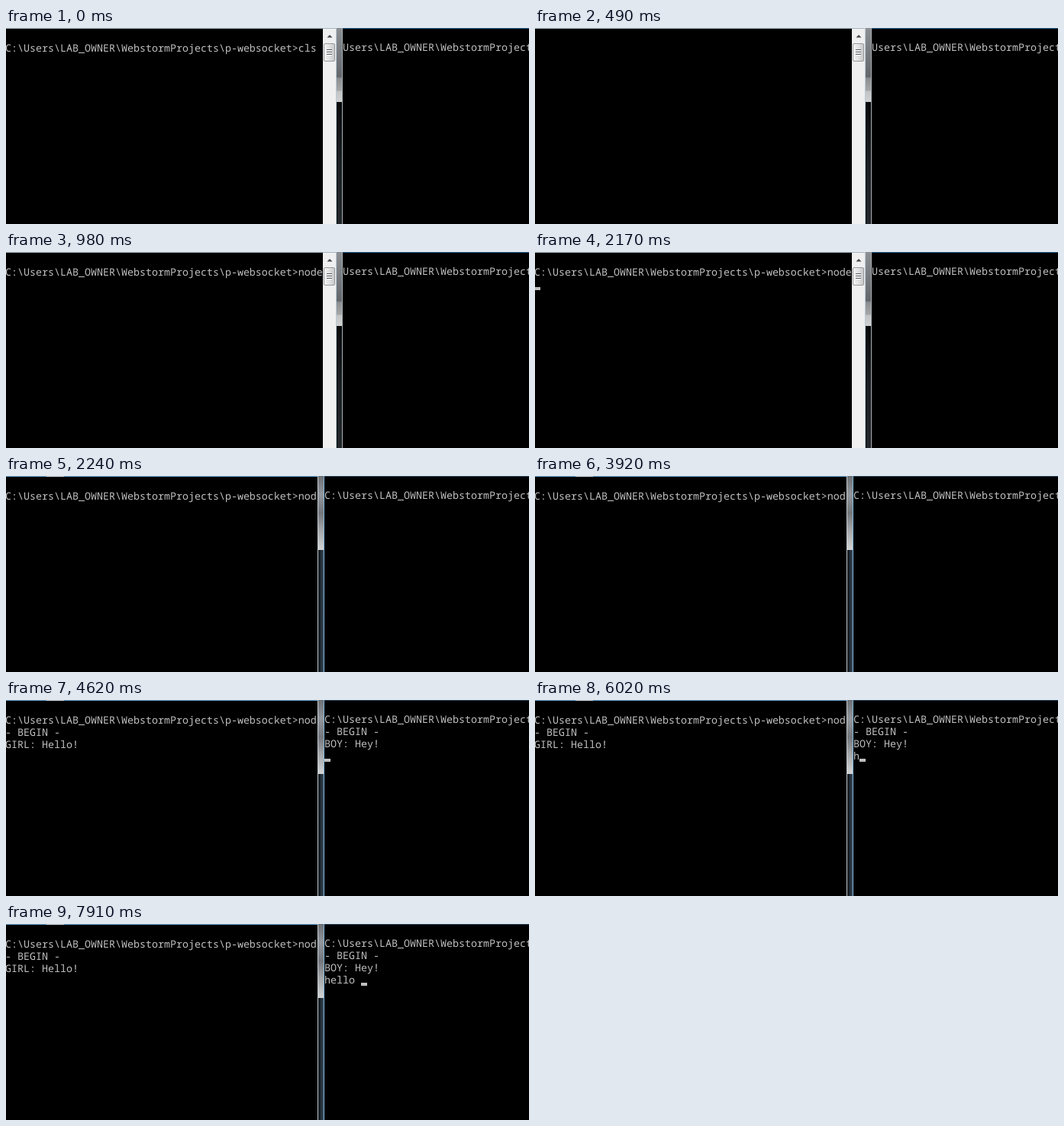
Animation of 685 by 257 pixels, one loop 8000 ms. Source, as an HTML page:

```html
<!DOCTYPE html>
<html lang="en">
<head>
<meta charset="utf-8">
<title>Two consoles</title>
<style>
  html, body { margin: 0; width: 100%; height: 100%; overflow: hidden; background: #000; }
  svg { display: block; width: 685px; height: 257px; }
  text {
    font: 13.3333px "Noto Sans Mono", "DejaVu Sans Mono", monospace;
    fill: #c0c0c0;
    white-space: pre;
    text-rendering: geometricPrecision;
  }
</style>
</head>
<body>
<svg viewBox="0 0 685 257" xmlns="http://www.w3.org/2000/svg">
  <defs>
    <linearGradient id="glass" x2="0" y2="1">
      <stop offset="0" stop-color="#8d9093"/>
      <stop offset=".35" stop-color="#777a7e"/>
      <stop offset=".66" stop-color="#64686c"/>
      <stop offset=".68" stop-color="#8c8f91"/>
      <stop offset=".84" stop-color="#a4a6a7"/>
      <stop offset=".86" stop-color="#c3c4c5"/>
      <stop offset="1" stop-color="#d0d1d1"/>
    </linearGradient>
    <linearGradient id="streak" x2="0" y2="1">
      <stop offset="0" stop-color="#6c7176"/>
      <stop offset=".25" stop-color="#92979c"/>
      <stop offset=".5" stop-color="#73787d"/>
      <stop offset=".72" stop-color="#a2a5a8"/>
      <stop offset="1" stop-color="#d2d4d5"/>
    </linearGradient>
    <linearGradient id="dark" x2="0" y2="1">
      <stop offset="0" stop-color="#08090b"/>
      <stop offset=".5" stop-color="#1b1f23"/>
      <stop offset="1" stop-color="#23272b"/>
    </linearGradient>
    <linearGradient id="edge">
      <stop offset="0" stop-color="#12161a"/>
      <stop offset=".5" stop-color="#232d36"/>
      <stop offset="1" stop-color="#3a5063"/>
    </linearGradient>
    <linearGradient id="thumb">
      <stop offset="0" stop-color="#f4f4f4"/>
      <stop offset=".5" stop-color="#e2e2e3"/>
      <stop offset="1" stop-color="#c6c6c8"/>
    </linearGradient>
    <clipPath id="leftClip"><rect id="leftBox" height="257"/></clipPath>
    <clipPath id="rightClip"><rect id="rightBox" height="257"/></clipPath>
  </defs>
  <rect width="685" height="257"/>
  <g clip-path="url(#leftClip)" id="left"></g>
  <g clip-path="url(#rightClip)" id="right"></g>

  <g id="leftFront">
    <rect width="434" height="1" fill="#a3b4c0"/>
    <rect x="441" width="244" height="1" fill="#2a5f8d"/>
    <rect x="415" y="1" width="17" height="256" fill="#f0f0f0"/>
    <path d="M420.500 12.500L424 9L427.500 12.500Z" fill="#404347"/>
    <rect x="416.500" y="20.500" width="14" height="23" rx="1.500" fill="url(#thumb)" stroke="#96989b"/>
    <path d="M420 28.500h7M420 31.500h7M420 34.500h7" stroke="#55585c"/>
    <path d="M420 29.500h7M420 32.500h7M420 35.500h7" stroke="#fff"/>
    <rect x="432" width="1" height="257" fill="#b7c9d5"/>
    <rect x="433" width="7" height="97" fill="url(#glass)"/>
    <rect x="433" y="97" width="7" height="160" fill="url(#dark)"/>
    <rect x="433" y="97" width="1" height="160" fill="#08090a"/>
    <rect x="440" width="1" height="257" fill="#a9adb1"/>
  </g>

  <g id="rightFront">
    <rect width="408" height="1" fill="#6aa6d2"/>
    <rect x="53" width="23" height="1" fill="#d9e2e8"/>
    <rect x="417" width="268" height="1" fill="#24435a"/>
    <rect x="408" width="1" height="257" fill="#c3cad0"/>
    <rect x="409" width="7" height="97" fill="url(#streak)"/>
    <rect x="409" y="97" width="7" height="160" fill="url(#edge)"/>
    <rect x="416" width="1" height="257" fill="#83b4d6"/>
  </g>
</svg>
<script>
const LOOP = 8000, CELL = 8, ROW = 16;
const PROMPT = "C:\\Users\\LAB_OWNER\\WebstormProjects\\p-websocket>";
const $ = id => document.getElementById(id);

function add(parent, tag, attrs) {
  const el = document.createElementNS("http://www.w3.org/2000/svg", tag);
  for (const key in attrs) el.setAttribute(key, attrs[key]);
  return parent.appendChild(el);
}

function makeConsole(parent, x, base) {
  const rows = [0, 1, 2, 3].map(i => add(parent, "text", { x, y: base + i * ROW }));
  const caret = add(parent, "rect", { width: CELL, height: 4, fill: "#c0c0c0" });
  return (lines, cursor) => {
    rows.forEach((row, i) => { row.textContent = lines[i] || ""; });
    caret.style.display = cursor ? "" : "none";
    if (!cursor) return;
    caret.setAttribute("x", x + cursor[0] * CELL);
    caret.setAttribute("y", base - 1 + cursor[1] * ROW);
  };
}

// Value of the last [time, value] step already reached.
const at = (steps, t) => steps.reduce((v, [start, next]) => t >= start ? next : v, null);

const drawLeft = makeConsole($("left"), -1, 31);
const drawRight = makeConsole($("right"), 417, 30);

const command = [[0, PROMPT + "cls"], [490, ""], [560, PROMPT], [980, PROMPT + "node"]];
const leftCursor = [[70, [51, 0]], [490, null], [1050, [0, 1]], [1540, null], [2030, [0, 1]], [2240, null]];
const scroll = [[0, 0], [2940, 2], [3570, 3], [3920, 0]];
const typed = [[0, 0], [6020, 1], [6090, 2], [6300, 3], [6510, 4], [6650, 5]];
const rightCursor = [[4620, 0], [5040, null], [5530, 0], [6020, 1], [6090, null],
  [6510, 4], [6650, null], [7000, 6], [7420, null], [7910, 6]];

function render(t) {
  const swapped = t >= 2240, talking = t >= 3990;
  $("leftFront").style.display = swapped ? "none" : "";
  $("rightFront").style.display = swapped ? "" : "none";
  $("leftBox").setAttribute("width", swapped ? 407 : 415);
  $("rightBox").setAttribute("x", swapped ? 417 : 441);
  $("rightBox").setAttribute("width", swapped ? 268 : 244);

  drawLeft([at(command, t), talking && "- BEGIN -", talking && "GIRL: Hello!"], at(leftCursor, t));

  const col = at(rightCursor, t);
  drawRight([
    PROMPT.slice(at(scroll, t)),
    talking && "- BEGIN -",
    talking && "BOY: Hey!",
    "hello".slice(0, at(typed, t))
  ], col === null ? null : [col, 3]);
}

const start = performance.now();
function tick() {
  render((performance.now() - start) % LOOP);
  requestAnimationFrame(tick);
}
tick();
</script>
</body>
</html>
```
